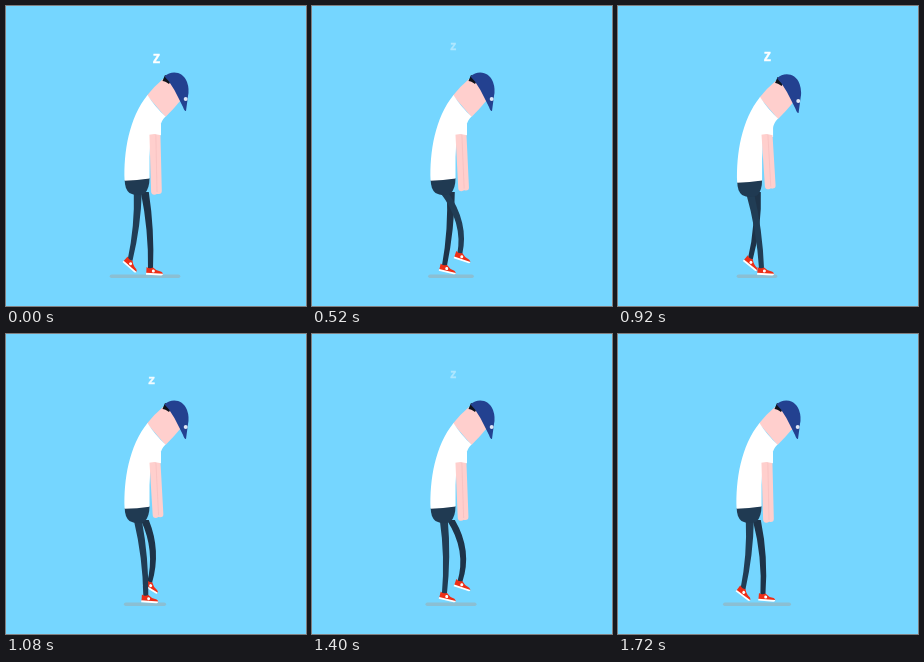
An HTML page for the animation above (1760 ms loop, 300 px wide and 300 px high).

```html
<!DOCTYPE html>
<html lang="en">
<head>
<meta charset="utf-8">
<title>Sleepwalker</title>
<style>
  html, body { margin: 0; width: 100%; height: 100%; overflow: hidden; background: #75d6ff; }
  svg { display: block; width: 100vw; height: 100vh; }
  text { font: bold 12.5px "Liberation Mono", monospace; text-anchor: middle; fill: #fff; stroke: #fff; stroke-width: .5; }
  .arm { fill: none; stroke: #ffcfcd; stroke-width: 6.4; stroke-linecap: round; }
  #seam { stroke: #f6c0c0; stroke-width: .8; }
</style>
</head>
<body>
<svg viewBox="0 0 300 300">
  <defs>
    <g id="shoe">
      <path d="M-4 -1Q-1 1 2.500 -1Q6 2.500 11 3Q13 4 12.800 5.500L-4 5.500Z" fill="#ee2e16"/>
      <path d="M-4.200 4.800H12.900Q12.800 6.600 11 6.600H-4.200Z" fill="#fff"/>
      <circle cx="3" cy="2.600" r="1.500" fill="#fff"/>
    </g>
  </defs>
  <line id="shadow" y1="270.200" y2="270.200" stroke="#8bbfd3" stroke-width="3.600" stroke-linecap="round"/>
  <g id="farLeg" fill="#1e3348"><path/><use href="#shoe"/></g>
  <g id="nearLeg" fill="#213d55"><path/><use href="#shoe"/></g>
  <g id="body">
    <path d="M118.700 174L143.500 172Q143.500 183 138.500 187.500Q130.500 191 123.500 187Q118.700 183 118.700 174Z" fill="#203a52"/>
    <path d="M141 89.500Q148 80.500 157 73L164 73L175 94Q168 102.500 159.500 111Z" fill="#ffcfcd"/>
    <path d="M156.500 75L159 69L166 73L163 78Q159 75 156.500 75Z" fill="#10131c"/>
    <path d="M158.500 70.500C165 64 177 65 181 76Q183.500 83 182 90L180 105Q178.500 105.500 177 101L173.500 94Q169 84 163 75.500Z" fill="#234190"/>
    <circle cx="179.700" cy="93" r="2" fill="#dfe6f5"/>
    <path d="M118.600 174.800C117.500 146 123 112 141.500 89Q149 101 159.500 110.500Q155 115 154.500 120V129H144Q144.500 135 143.500 151V172.600Q131 174.600 118.600 174.800Z" fill="#fff"/>
  </g>
  <path id="farArm" class="arm"/>
  <path id="nearArm" class="arm"/>
  <path id="seam"/>
  <path d="M140 118H155V129.300L148.500 128L141 129Z" fill="#fff"/>
  <text id="snore">Z</text>
</svg>
<script>
const LOOP = 1760, STEP = LOOP / 2, FRAME = 40;
const { PI, sin, cos } = Math;
const $ = id => document.getElementById(id);
const set = (id, attrs) => { for (const k in attrs) $(id).setAttribute(k, attrs[k]); };

// Ankle, shoe angle and knee bend; the foot lands at time 0 and lifts after one step
function gait(t) {
  const u = t / STEP;
  if (u < 1) return { x: 144.5 - 20.5 * u, y: 262.3 - 8.5 * u * u, angle: 3 + 38 * u ** 2.5, bend: 2 };
  const v = u - 1;
  return {
    x: 124 + 20.5 * v + 15.5 * sin(PI * v ** .6),
    y: 253.8 + 8.5 * v - 12 * sin(PI * v),
    angle: 41 - 38 * v,
    bend: 2 + 5.5 * sin(PI * v)
  };
}

function drawLeg(id, hipX, t) {
  const { x, y, angle, bend } = gait(t % LOOP), hipY = 186;
  const kneeX = (hipX + x) / 2 + 2 * bend, kneeY = (hipY + y) / 2;
  const [limb, shoe] = $(id).children;
  limb.setAttribute('d', `M${hipX - 4} ${hipY}Q${kneeX - 3} ${kneeY} ${x - 2.5} ${y + 1}` +
    `H${x + 2.5}Q${kneeX + 3} ${kneeY} ${hipX + 4} ${hipY}Z`);
  shoe.setAttribute('transform', `translate(${x} ${y}) rotate(${angle})`);
}

function drawArms(t) {
  const lift = 1 - cos(2 * PI * t / LOOP);
  const arm = (top, x, y) => ({ d: `M${top} 127L${x + lift * .9} ${y - lift * 2.7}` });
  set('nearArm', arm(146.6, 148.3, 185.5));
  set('farArm', arm(151.2, 152.6, 184.8));
  set('seam', arm(149.8, 151, 186));
}

function drawSnore(t) {
  const p = Math.min(t / 680, 1), rise = 1 - (1 - p) ** 2;
  set('snore', {
    transform: `translate(${150.5 - 9.8 * rise} ${56.5 - 12.8 * rise}) scale(${1 - .2 * rise})`,
    opacity: 1 - p * p
  });
}

function draw(t) {
  drawLeg('farLeg', 138.8, t);
  drawLeg('nearLeg', 131.8, t + STEP);
  drawArms(t);
  drawSnore(t % STEP);

  const half = 18.5 + 15 * (1 - t / STEP) ** 2;
  set('shadow', { x1: 139 - half, x2: 139 + half });

  const dip = 2 * Math.exp(-(((t - 900) / 90) ** 2));
  set('body', { transform: `translate(${dip * .3} ${dip})` });
}

const start = performance.now();
function tick() {
  const t = (performance.now() - start) % LOOP;
  draw(Math.floor(t / FRAME) * FRAME);
  requestAnimationFrame(tick);
}
tick();
</script>
</body>
</html>
```
